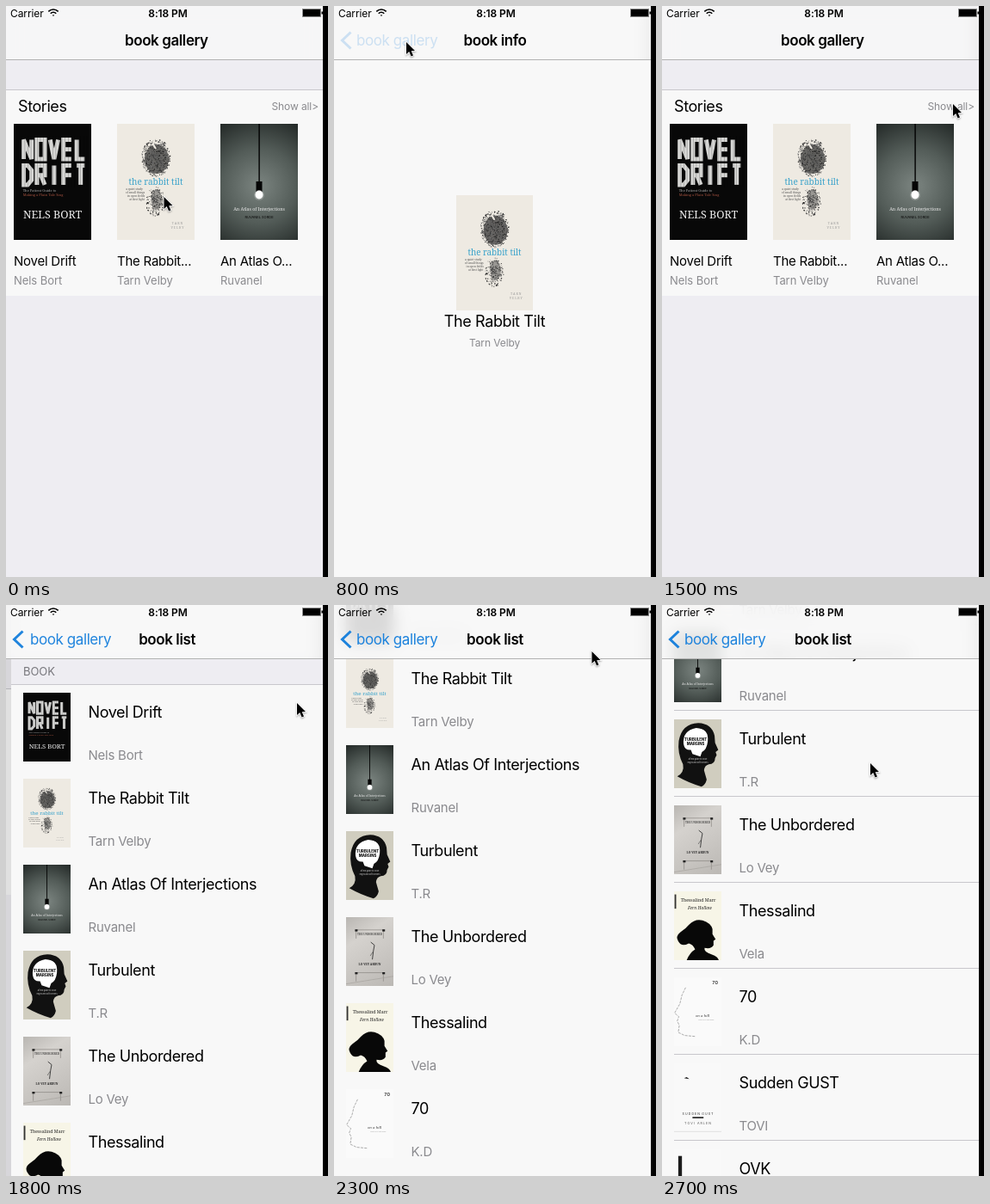
An HTML page with a canvas for the animation above (2800 ms loop, 374x664 px).

```html
<!DOCTYPE html>
<html lang="en">
<head>
<meta charset="utf-8">
<title>book gallery</title>
<style>
html, body { margin: 0; width: 100%; height: 100%; overflow: hidden; background: #000; }
canvas { display: block; }
</style>
</head>
<body>
<canvas id="stage" width="374" height="664"></canvas>
<script>
const canvas = document.getElementById('stage');
const ctx = canvas.getContext('2d');
const W = 368, H = 664, NAV = 62, TICK = 100, TICKS = 28;
const PAPER = '#f8f8f8', GROUP = '#eeedf2', LINE = '#c8c7cc', GREY = '#8a8a8e', BLUE = '#1c82dc';
const SANS = 'Inter, sans-serif', SERIF = '"Noto Serif", serif';
const TRACKING = { 12: -0.1, 13: -0.06, 15: -0.24, 17: -0.41, 18: -0.4 };

const books = [
  ['Novel Drift', 'Nels Bort', coverLetters],
  ['The Rabbit Tilt', 'Tarn Velby', coverAnimal],
  ['An Atlas Of Interjections', 'Ruvanel', coverBulb],
  ['Turbulent', 'T.R', coverHead],
  ['The Unbordered', 'Lo Vey', coverFrame],
  ['Thessalind', 'Vela', coverBust],
  ['70', 'K.D', coverProfile],
  ['Sudden GUST', 'TOVI', coverBlank],
  ['OVK', 'Pell', coverBar]
];

function rect(x, y, w, h, color) {
  ctx.fillStyle = color;
  ctx.fillRect(x, y, w, h);
}

function text(str, x, y, size, color = '#000', align = 'left', weight = 400) {
  ctx.font = `${weight} ${size}px ${SANS}`;
  ctx.letterSpacing = (TRACKING[size] || 0) + 'px';
  ctx.textAlign = align;
  ctx.fillStyle = color;
  ctx.fillText(str, x, y + size * 0.35);
  ctx.letterSpacing = '0px';
}

function print(str, x, y, size, color, font = SERIF, style = '') {
  ctx.font = `${style} ${size}px ${font}`;
  ctx.textAlign = 'center';
  ctx.fillStyle = color;
  ctx.fillText(str, x, y);
}

function line(points, color, width) {
  ctx.beginPath();
  points.forEach(([x, y]) => ctx.lineTo(x, y));
  ctx.strokeStyle = color;
  ctx.lineWidth = width;
  ctx.stroke();
}

function shape(path, color) {
  ctx.fillStyle = color;
  ctx.fill(new Path2D(path));
}

function ellipse(x, y, rx, ry, color) {
  ctx.beginPath();
  ctx.ellipse(x, y, rx, ry, 0, 0, 7);
  ctx.fillStyle = color;
  ctx.fill();
}

function seeded(seed) {
  return () => (seed = (seed * 16807) % 2147483647) / 2147483647;
}

// Covers are drawn in a 90 x 135 space.
function drawCover(draw, x, y, w, h) {
  ctx.save();
  ctx.translate(x, y);
  ctx.scale(w / 90, h / 135);
  ctx.beginPath();
  ctx.rect(0, 0, 90, 135);
  ctx.clip();
  draw();
  ctx.restore();
}

const GLYPHS = {
  N: '04 00 24 20', O: '00 20 24 04 00 20', V: '00 14 20', E: '20 00 04 24|02 22', L: '00 04 24',
  D: '00 10 21 23 14 04 00 10', R: '04 00 20 22 02|12 24', I: '10 14', F: '20 00 04|02 22', T: '00 20|10 14'
};

function blockWord(word, x, y) {
  ctx.miterLimit = 2;
  [...word].forEach((letter, i) => {
    for (const part of GLYPHS[letter].split('|')) {
      line(part.split(' ').map(([a, b]) => [x + i * 15.4 + a * 4.6, y + b * 5.6]), '#d6d6d4', 5);
    }
  });
}

function coverLetters() {
  rect(0, 0, 90, 135, '#080808');
  blockWord('NOVEL', 11.5, 18.5);
  blockWord('DRIFT', 11.5, 48.5);
  for (let x = 9; x < 85; x += 3.6) rect(x, 14, 0.6, 60, 'rgba(0,0,0,.3)');
  print('The Patient Guide to', 30, 79, 4, '#aaa');
  print('Making a Plain Tale Sing', 34, 84, 4, '#a4523f');
  print('NELS BORT', 45, 110, 12.5, '#eee');
}

function speckle(x, y, rx, ry, count, seed) {
  const rand = seeded(seed);
  for (let i = 0; i < count; i++) {
    const a = rand() * 6.283, r = Math.pow(rand(), 0.6), s = 0.5 + rand() * 0.8;
    const shade = Math.floor(20 + rand() * 100);
    rect(x + Math.cos(a) * r * rx, y + Math.sin(a) * r * ry, s, s, `rgb(${shade},${shade},${shade})`);
  }
}

function coverAnimal() {
  rect(0, 0, 90, 135, '#eeeae2');
  ellipse(46, 41, 14, 17, 'rgba(45,45,45,.7)');
  speckle(45, 39, 17, 22, 620, 11);
  line([[44, 17], [42, 24], [45, 29]], '#eeeae2', 2);
  ellipse(46, 88, 6, 12, 'rgba(70,70,70,.5)');
  speckle(44, 90, 11, 17, 220, 29);
  print('the rabbit tilt', 45, 70.5, 10, '#3ba3cb');
  ['a quiet study', 'of small things', 'in open fields', 'at first light'].forEach((s, i) =>
    print(s, 20 + i, 77 + i * 4, 3.2, '#555'));
  print('T A R N', 70, 117, 3.6, '#999');
  print('V E L B Y', 70, 122, 3.6, '#999');
}

function coverBulb() {
  const glow = ctx.createRadialGradient(45, 72, 5, 45, 72, 82);
  glow.addColorStop(0, '#77807c');
  glow.addColorStop(0.5, '#535c58');
  glow.addColorStop(1, '#262c2a');
  rect(0, 0, 90, 135, glow);
  rect(44.4, 0, 1.4, 68, '#000');
  rect(41.5, 67, 7, 12, '#050505');
  ellipse(45, 83, 6, 6, 'rgba(255,255,255,.2)');
  ellipse(45, 82.5, 4.5, 5, '#fff');
  print('An Atlas of Interjections', 45, 101, 5.2, '#eee');
  print('RUVANEL SORDE', 45, 110, 4, '#080808', SANS);
}

function coverHead() {
  rect(0, 0, 90, 135, '#d0cdbf');
  shape('M6 112 Q20 104 17 88 Q6 66 9 42 Q15 8 46 7 Q72 8 77 32 L78 46 L84 60 L79 64 L81 70 L78 76 Q78 88 66 88 Q58 90 57 100 L62 118 Q60 128 52 132 Q30 126 6 112Z', '#111');
  shape('M18 48 Q16 22 42 17 Q67 18 64 44 Q62 60 53 64 L50 73 L35 68 L32 60 Q20 61 18 48Z', '#fff');
  print('TURBULENT', 41, 43, 7, '#111', SANS, '800');
  print('MARGINS', 41, 51, 7, '#111', SANS, '800');
  print('a field guide to loose', 45, 80, 3.6, '#ddd', SANS);
  print('edges and soft borders', 45, 86, 3.6, '#ddd', SANS);
}

function coverFrame() {
  const shade = ctx.createLinearGradient(0, 0, 90, 135);
  shade.addColorStop(0, '#b9b6b2');
  shade.addColorStop(0.3, '#d5d2ce');
  shade.addColorStop(1, '#bbb8b4');
  rect(0, 0, 90, 135, shade);
  for (const y of [24, 108]) {
    line([[19, y + 18], [19, y + 1], [71, y + 1], [71, y + 18]], '#8b8783', 1.2);
    rect(17, y, 5, 4, '#222');
    rect(69, y, 5, 4, '#222');
  }
  print('THE UNBORDERED', 45, 35, 5.2, '#222');
  line([[47, 49], [54, 55], [52, 66], [50, 83]], '#333', 1.5);
  line([[51, 68], [46, 76]], '#444', 1);
  print('LO VEY ARDUN', 45, 95, 5.5, '#222', SERIF, '700');
  line([[0, 131], [90, 116]], '#a29e99', 1);
}

function coverBust() {
  rect(0, 0, 90, 135, '#f7f5e7');
  rect(1, 6, 3, 28, '#333');
  print('Thessalind Marr', 46, 21, 8.5, '#222');
  print('Fern Hollow', 49, 35, 8, '#222', SERIF, 'italic');
  shape('M24 135 Q30 120 40 114 Q36 104 28 102 Q14 110 8 98 Q2 88 12 80 Q22 74 28 66 Q40 53 54 57 Q70 62 73 74 L73 84 L79 94 L75 97 L75 106 Q70 114 58 111 Q56 119 72 124 Q83 128 85 135Z', '#080808');
}

function coverProfile() {
  rect(0, 0, 90, 135, '#fafafa');
  ctx.setLineDash([5, 2]);
  line([[22, 20], [15, 35], [11, 52], [1, 70], [9, 77], [6, 86], [10, 94], [8, 108], [20, 114], [41, 116]], '#777', 1);
  ctx.setLineDash([]);
  print('70', 78, 14, 9, '#333', SANS, '600');
  print('on a hill', 54, 78, 7, '#444', SERIF, 'italic');
  print('notes on a long walk', 61, 84, 3, '#999');
}

function coverBlank() {
  rect(0, 0, 90, 135, '#f9f9f9');
  shape('M19 29 L24 27 L29 31 L24 30Z', '#111');
  print('S U D D E N  G U S T', 45, 101, 6, '#333', SANS);
  rect(35, 105, 21, 3, '#333');
  print('T O V I   A R L E N', 45, 120, 6, '#555', SANS);
  rect(0, 133, 90, 1.5, '#ddd');
}

function coverBar() {
  rect(0, 0, 90, 135, '#f9f9f9');
  rect(8, 13, 7, 122, '#1c1c1c');
}

function gallery() {
  rect(0, 0, 375, H, GROUP);
  rect(0, 97, 375, 240, PAPER);
  rect(0, 97, 375, 1, LINE);
  text('Stories', 14, 117, 18);
  text('Show all>', 363, 117, 12, GREY, 'right');
  const short = ['Novel Drift', 'The Rabbit...', 'An Atlas O...'];
  short.forEach((title, i) => {
    const x = 9 + i * 120;
    drawCover(books[i][2], x, 137, 90, 135);
    text(title, x, 297, 15);
    text(books[i][1], x, 319.5, 13, GREY);
  });
}

function info() {
  rect(0, 0, 375, H, PAPER);
  drawCover(coverAnimal, 142, 220, 89, 134);
  text(books[1][0], 186.5, 367, 18, '#000', 'center');
  text(books[1][1], 186.5, 392, 12, GREY, 'center');
}

function list(scroll) {
  rect(0, 0, 375, H, PAPER);
  ctx.save();
  ctx.translate(0, -Math.floor(scroll));
  rect(0, NAV, 375, 30, GROUP);
  rect(0, 92, 375, 1, LINE);
  text('BOOK', 14, 77.5, 13, '#77777c');
  books.forEach(([title, author, cover], i) => {
    const y = i * 100;
    drawCover(cover, 14, 102 + y, 55, 80);
    text(title, 89.5, 125 + y, 18);
    text(author, 89.5, 175 + y, 15, GREY);
    // Hairlines only land on a pixel at half-point offsets.
    if (scroll % 1) rect(14, 191 + y, 361, 1, LINE);
  });
  ctx.restore();
}

function shifted(dx, draw, arg) {
  ctx.save();
  ctx.translate(dx, 0);
  draw(arg);
  ctx.restore();
}

function statusBar() {
  text('Carrier', 5, 8.3, 12);
  text('8:18 PM', 188, 8.3, 12, '#000', 'center', 600);
  ctx.strokeStyle = '#000';
  ctx.lineWidth = 1.6;
  for (const r of [1, 4.6, 8]) {
    ctx.beginPath();
    ctx.arc(55, 12, r, -2.36, -0.78);
    ctx.stroke();
  }
  rect(344, 3, 22, 10, '#8c8c8c');
  rect(345, 4, 20, 8, '#000');
  rect(366.5, 6.5, 1.5, 3, '#000');
}

// away: 1 while the gallery is shown, 0 once the next page has arrived
function navBar(title, away, pressed) {
  ctx.save();
  ctx.beginPath();
  ctx.rect(0, 0, W, NAV);
  ctx.clip();
  ctx.filter = 'blur(9px)';
  ctx.drawImage(canvas, 0, 0);
  ctx.filter = 'none';
  rect(0, 0, W, NAV, 'rgba(249,249,249,.86)');
  ctx.restore();
  rect(0, NAV, W, 1, '#b2b2b2');
  const backX = 26 + away * 112;
  ctx.globalAlpha = away * away;
  if (away) text('book gallery', backX, 40, 17, '#000', 'left', 600);
  ctx.globalAlpha = (1 - away) * (pressed ? 0.2 : 1);
  text('book gallery', backX, 40, 17, BLUE);
  line([[19.5, 30.5], [9.5, 40], [19.5, 49.5]], BLUE, 3);
  ctx.globalAlpha = 1 - away;
  text(title, 187 + 187 * away * away, 40, 17, '#000', 'center', 600);
  ctx.globalAlpha = 1;
}

function cursor(x, y) {
  ctx.save();
  ctx.translate(x, y);
  const arrow = new Path2D('M0 0 L0 14 L3.2 11.1 L5.6 16.4 L8 15.4 L5.7 10.2 L10 10Z');
  ctx.shadowColor = 'rgba(0,0,0,.35)';
  ctx.shadowBlur = 2;
  ctx.shadowOffsetY = 1;
  ctx.strokeStyle = '#fff';
  ctx.lineWidth = 1.6;
  ctx.stroke(arrow);
  ctx.shadowColor = 'transparent';
  ctx.fillStyle = '#000';
  ctx.fill(arrow);
  ctx.restore();
}

// Critically damped slide: remaining share of the distance
function spring(ticks, phase) {
  const k = phase + 3.6 * ticks;
  if (ticks < 0) return 1;
  return k > 6.9 ? 0 : (1 + k) * Math.exp(-k);
}

function along(keys, t) {
  let i = 0;
  while (i < keys.length - 2 && keys[i + 1][0] <= t) i++;
  const [t0, ...a] = keys[i], [t1, ...b] = keys[i + 1];
  const p = Math.min(1, (t - t0) / (t1 - t0));
  return a.map((v, j) => v + (b[j] - v) * p);
}

const pointer = [
  [0, 183.5, 222], [2, 183.5, 222], [4, 140, 130], [6, 88, 48], [8, 84, 42], [10, 84, 42],
  [12, 110, 180], [13, 200, 200], [14, 300, 140], [15, 338, 114], [18, 338, 114],
  [20, 314, 193], [21, 310, 163], [22, 305, 108], [23, 299.5, 54], [24, 290, 75], [27, 242, 184]
];
const scrolling = [[0, 0], [20, 0], [21, 30], [22, 85], [23, 139], [24, 186.5], [25, 224.5], [26, 251.5], [27, 269.5]];

function draw(tick) {
  const toList = tick >= 15;
  const away = toList ? spring(tick - 17, 2.4)
    : tick < 9 ? spring(tick - 1, 3.6)
    : 1 - spring(tick - 9, 2.4);
  const page = toList ? list : info;
  ctx.save();
  ctx.beginPath();
  ctx.rect(0, 0, W, H);
  ctx.clip();
  if (away > 0) {
    shifted(Math.round(-112 * (1 - away)), gallery);
    rect(0, 0, W, H, `rgba(0,0,0,${0.1 * (1 - away)})`);
  }
  if (away < 1) shifted(Math.floor(375 * away), page, along(scrolling, tick)[0]);
  navBar(toList ? 'book list' : 'book info', away, tick === 8);
  statusBar();
  ctx.restore();
  rect(W, 0, 6, H, '#000');
  cursor(...along(pointer, tick));
}

let shown = -1;
function loop() {
  const tick = Math.floor(performance.now() / TICK) % TICKS;
  if (tick !== shown) draw(shown = tick);
  requestAnimationFrame(loop);
}
loop();
</script>
</body>
</html>
```
